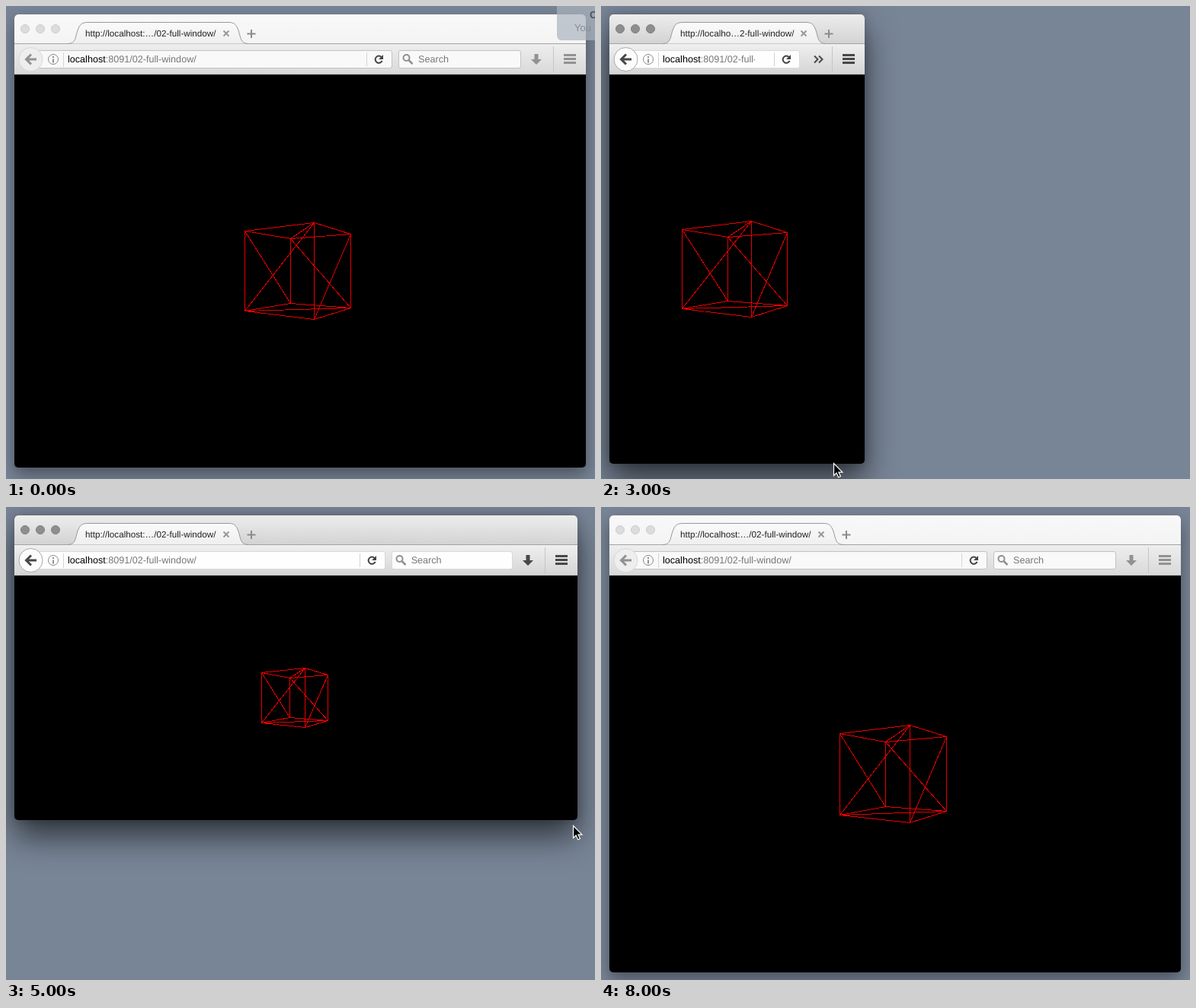
Write an HTML page that moves like this. It is 773x621 px and loops after 8.5 s.

```html
<!DOCTYPE html>
<html lang="en">
<head>
<meta charset="utf-8">
<title>Resizing a full-window cube</title>
<style>
html, body { margin: 0; width: 100%; height: 100%; overflow: hidden; }
body {
  --icon: #484848; --dot: #8e8e90; --dot-edge: #7f7f81; --field: #fefefe; --edge: #d9d9d9; --back: #fcfcfc; --ring: #a9a9a9;
  --strip: linear-gradient(#ededed, #d3d3d3); --nav: linear-gradient(#efefef, #d5d5d5);
  --shadow: 0 22px 42px rgba(0,0,0,.6), 0 0 14px rgba(0,0,0,.2);
  position: relative; background: #788597;
  font: 12.6px "Liberation Sans", Arial, sans-serif; text-rendering: geometricPrecision; white-space: nowrap;
}
body.idle {
  --icon: #929292; --dot: #dcdcdc; --dot-edge: #cdcdcd; --field: #f9f9f9; --edge: #c2c2c2; --back: #eee; --ring: #d8d8d8;
  --strip: linear-gradient(#f8f8f8, #f4f4f4); --nav: linear-gradient(#eee, #d9d9d9);
  --shadow: 0 9px 22px rgba(0,0,0,.4);
}
body *, svg { position: absolute; }
svg { overflow: visible; fill: none; }
b, span { position: static !important; font-weight: normal; }
#win { left: 11px; top: 11px; border-radius: 5px; background: #000; box-shadow: var(--shadow); }
#strip { left: 0; right: 0; height: 38px; background: var(--strip); border-bottom: 1px solid #a3a3a3; border-radius: 5px 5px 0 0; }
#nav { left: 0; right: 0; top: 39px; height: 39px; background: var(--nav); border-bottom: 1px solid #bdbdbd; }
#label { left: 93px; top: 16px; font-size: 11.7px; line-height: 20px; color: #222; }
.field { top: 8px; height: 24px; line-height: 24px; box-sizing: border-box; background: var(--field); border: 1px solid var(--edge); border-radius: 3px; color: #777; }
.field div { top: -1px; }
#url { left: 30px; }
#address { left: 39px; right: 58px; height: 24px; overflow: hidden; }
#address b { color: #000; }
#search { right: 85px; }
#search div { left: 25px; }
#note { left: 723px; top: -10px; width: 60px; height: 55px; border-radius: 0 0 0 6px; background: rgba(172,180,190,.7); }
#note div { left: 23px; top: 31px; font-size: 13px; color: #858d98; }
#note div:first-child { left: 43px; top: 14px; font-weight: bold; color: #4a5260; }
</style>
</head>
<body>
<div id="win">
  <div id="strip">
    <svg width="330" height="39">
      <defs><linearGradient id="sheen" x2="0" y2="1"><stop stop-color="#fafafa"/><stop offset="1" stop-color="#efefef"/></linearGradient></defs>
      <g style="fill:var(--dot);stroke:var(--dot-edge)">
        <circle cx="14" cy="19" r="5.5"/><circle cx="34" cy="19" r="5.5"/><circle cx="54" cy="19" r="5.5"/>
      </g>
      <path id="tab" fill="url(#sheen)" stroke="#999"/>
      <g id="tabIcons" stroke="#8c8c8c" stroke-width="2">
        <path d="M274.500 21.500l7 7m0-7l-7 7" stroke="#999"/><path d="M305.500 25.500h11m-5.500-5.500v11"/>
      </g>
    </svg>
    <div id="label"></div>
  </div>
  <div id="nav">
    <div id="url" class="field">
      <div id="address"><b>localhost</b><span>:8091/02-full-window/</span></div>
      <svg style="right:0;top:-1px" width="40" height="24">
        <path d="M7.500 3v18" stroke="#d4d4d4"/>
        <path d="M27 9.500a4.600 4.600 0 1 0 .6 4.300" stroke="#444" stroke-width="2"/>
        <path d="M29 6v6h-6z" fill="#444"/>
      </svg>
    </div>
    <svg width="80" height="40">
      <circle cx="21.500" cy="20" r="15.500" style="fill:var(--back);stroke:var(--ring)"/>
      <path d="M29 20H16m6-6.500l-6.500 6.500 6.500 6.500" style="stroke:var(--icon)" stroke-width="3"/>
      <circle cx="51" cy="20" r="6.500" stroke="#8a8a8a"/>
      <path d="M51 16v2m0 1.500v5" stroke="#777" stroke-width="1.600"/>
      <path d="M64.500 11v19" stroke="#d4d4d4"/>
    </svg>
    <div id="search" class="field">
      <svg style="left:0;top:-1px" width="24" height="24" stroke="#8f8f8f" stroke-width="2">
        <circle cx="9.500" cy="10" r="4"/><path d="M12.500 13l5 5" stroke-width="2.500"/>
      </svg>
      <div>Search</div>
    </div>
    <svg style="right:0" width="100" height="40">
      <path id="download" d="M32.500 13h5v7h4.500L35 27l-7-7h4.500z" style="fill:var(--icon)"/>
      <path id="more" d="M34 15.500l4.500 4.500-4.500 4.500m6-9l4.500 4.500-4.500 4.500" style="stroke:var(--icon)" stroke-width="2"/>
      <path d="M57.500 3v34" stroke="#c6c6c6"/>
      <path d="M71 14.500h16m-16 5h16m-16 5h16" style="stroke:var(--icon)" stroke-width="3"/>
    </svg>
  </div>
</div>
<svg width="773" height="621" style="left:0;top:0">
  <path id="cube" stroke="#e80000" shape-rendering="crispEdges"/>
  <path id="cursor" d="M0 0V16l3.600-3.400 2.600 5.600 2.700-1.200-2.500-5.400h5z" fill="#000" stroke="#fff" stroke-width="1.200"/>
</svg>
<div id="note"><div>C</div><div>You</div></div>
<script>
const $ = id => document.getElementById(id);
const LOOP = 8500, STEP = 250, LEFT = 11, PAGE_TOP = 90;

// time, window right, window bottom, cursor x, cursor y
const keys = [
  [0, 761, 606, 752, 606], [750, 761, 606, 752, 606], [1750, 637, 519, 628, 519],
  [3000, 346, 601, 305, 600], [4250, 743, 217, 737, 216], [5500, 754, 540, 748, 552],
  [6250, 761, 606, 752, 607], [6500, 761, 611, 752, 611], [LOOP, 761, 611, 752, 611],
];

// Projected upright edges of the cube: x and half height, for a page 521 px tall
const posts = [[-73, 53.5], [19, 64], [67.5, 49], [-12.5, 42.5]];
// Each pair of corners: 0-3 are the top ends of the posts, 4-7 the bottom ends
const edges = "04 15 26 37 01 12 23 30 45 56 67 74 07 14 25 36 13 46".split(" ");

function pose(t) {
  const i = keys.findIndex(k => k[0] > t), a = keys[i - 1], b = keys[i];
  const f = (t - a[0]) / (b[0] - a[0]);
  return a.slice(1).map((v, j) => Math.round(v + (b[j + 1] - v) * f));
}

function drawCube(width, height) {
  const scale = height / 521, snap = v => Math.floor(v) + 0.5;
  const corner = n => {
    const [x, h] = posts[n % 4];
    return snap(LEFT + width / 2 + x * scale) + " " +
      snap(PAGE_TOP + height / 2 + (n < 4 ? -h : h) * scale);
  };
  $("cube").setAttribute("d", edges.map(([a, b]) => `M${corner(+a)}L${corner(+b)}`).join(""));
}

function layout(width) {
  const shrink = Math.max(0, 358 - width), narrow = width < 440;
  const searchWidth = 143 + 0.145 * (width - 626);
  $("tab").setAttribute("d", `M70 38.500C81 38.500 80 29 83 21C86 12.500 89 10.500 97 10.500
    H${281 - shrink}c7 0 10 2 13 10.500c3 8 2 17.500 13 17.500`);
  $("tabIcons").setAttribute("transform", `translate(${-shrink})`);
  $("label").textContent = shrink ? "http://localho…2-full-window/" : "http://localhost:…/02-full-window/";
  $("search").style.width = searchWidth + "px";
  $("search").style.display = $("download").style.display = narrow ? "none" : "";
  $("more").style.display = narrow ? "" : "none";
  $("url").style.right = (narrow ? 85 : 93 + searchWidth) + "px";
}

function draw(now) {
  const t = Math.floor(now % LOOP / STEP) * STEP;
  const [right, bottom, x, y] = pose(t), width = right - LEFT;
  $("win").style.width = width + "px";
  $("win").style.height = bottom - LEFT + "px";
  layout(width);
  drawCube(width, bottom - PAGE_TOP);
  $("cursor").setAttribute("transform", `translate(${x + 0.5} ${y + 0.5})`);
  $("cursor").style.display = t >= 500 && t < 7500 ? "" : "none";
  $("note").style.display = t < 250 ? "" : "none";
  document.body.className = t < 500 || t >= 7750 ? "idle" : "";
}

const start = performance.now();
function tick() {
  draw(performance.now() - start);
  requestAnimationFrame(tick);
}
tick();
</script>
</body>
</html>
```
